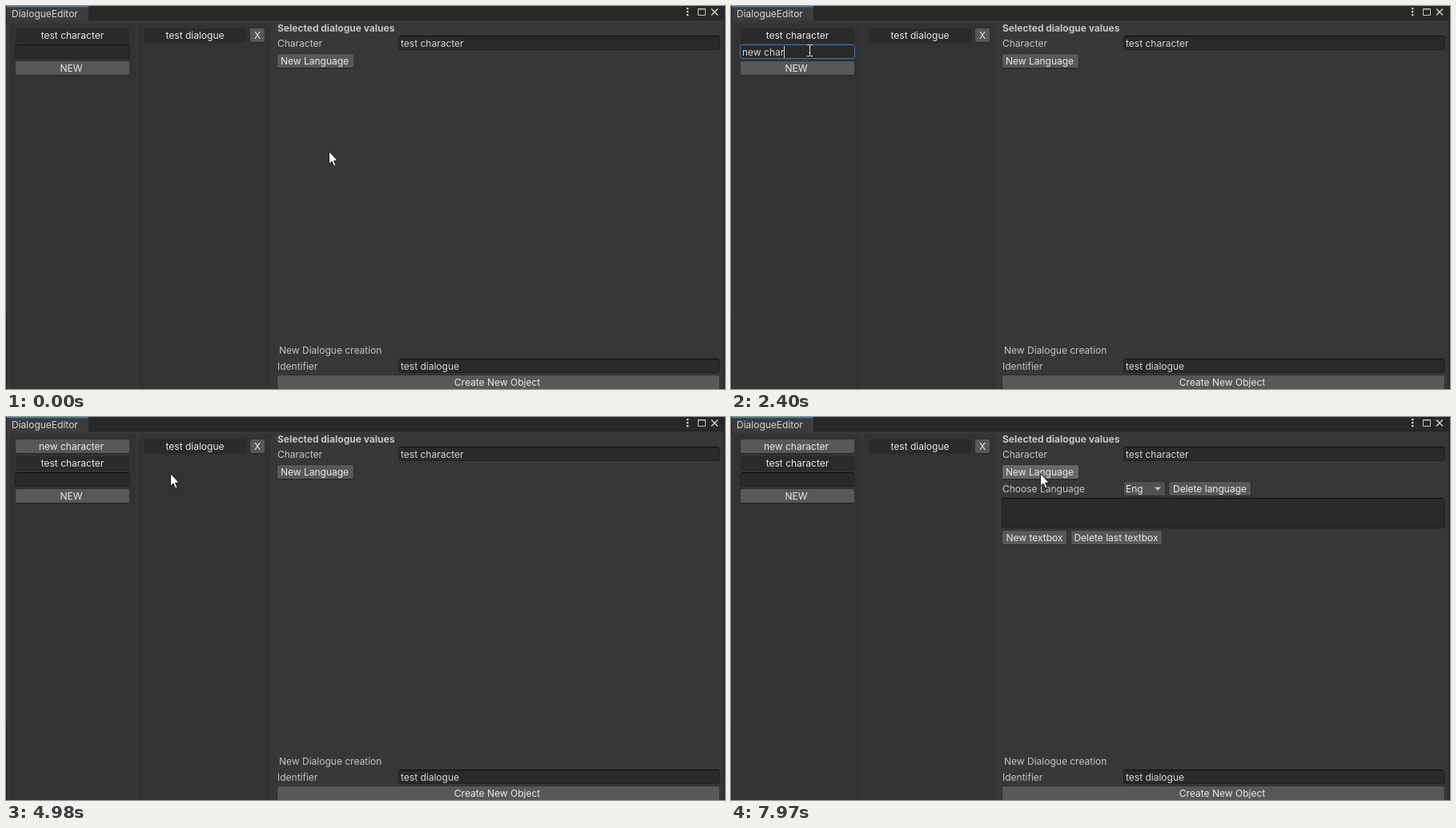
An HTML page that plays this animation: 898x478 px, repeating every 8 s.

```html
<!DOCTYPE html>
<html lang="en">
<head>
<meta charset="utf-8">
<title>Dialogue editor</title>
<style>
  html, body { margin: 0; width: 100%; height: 100%; overflow: hidden; background: #383838; }
  svg { display: block; width: 898px; height: 478px; }
  text { font: 12px Inter, Roboto, sans-serif; fill: #c4c4c4; white-space: pre; }
  .lit { fill: #e8e8e8; }
  .value { fill: #d6d6d6; }
  .mid { text-anchor: middle; }
  .bold { font-weight: 700; }
</style>
</head>
<body>
<svg id="stage" viewBox="0 0 898 478"></svg>
<script>
const LOOP = 8000;
const stage = document.getElementById('stage');

function add(parent, tag, attrs, text) {
  const node = document.createElementNS('http://www.w3.org/2000/svg', tag);
  for (const key in attrs) node.setAttribute(key, attrs[key]);
  if (text !== undefined) node.textContent = text;
  parent.appendChild(node);
  return node;
}
const group = (parent = stage) => add(parent, 'g', {});
const rect = (p, x, y, width, height, fill, rx = 0) =>
  add(p, 'rect', { x, y, width, height, fill, rx });
const label = (p, x, y, str, cls = '') => add(p, 'text', { x, y, class: cls }, str);
const show = (node, on) => node.setAttribute('display', on ? 'inline' : 'none');

function button(p, x, y, w, h, str, textX, textY, fill = '#585858') {
  rect(p, x - 1, y - 1, w + 2, h + 2, '#303030', 3);
  rect(p, x + 1, y + h, w - 2, 1, '#242424');
  const face = rect(p, x, y, w, h, fill, 2);
  label(p, textX, textY, str, textX > x + 8 ? 'lit mid' : 'lit');
  return face;
}
function picked(p, x, y, w, str, textX) {
  rect(p, x, y, w, 18, '#2b2b2b', 2);
  label(p, textX, y + 13, str, 'lit mid');
}
function field(p, x, y, w, h) {
  const box = add(p, 'rect', { x: x + .5, y: y + .5, width: w - 1, height: h - 1,
    rx: 2.5, fill: '#2a2a2a', stroke: '#212121' });
  const lip = rect(p, x + 2, y, w - 4, 1, '#0d0d0d');
  return { box, lip };
}

// Window frame
rect(stage, 0, 0, 898, 478, '#383838');
rect(stage, 0, 0, 898, 18, '#282828');
rect(stage, 0, 17, 898, 1, '#232323');
rect(stage, 1, 0, 102, 18, '#3c3c3c');
rect(stage, 1, 0, 102, 1.5, '#3a79bb');
rect(stage, 0, 18, 1.5, 460, '#262626');
rect(stage, 0, 22, 1.5, 363, '#412f45');
rect(stage, 895.5, 18, 2.5, 460, '#2b2b2b');
label(stage, 7, 14, 'DialogueEditor', 'value');
for (const y of [2, 6, 10]) rect(stage, 850, y, 2.4, 2.4, '#c4c4c4');
add(stage, 'path', { d: 'M864.5 3.5h9v8h-9zM864 4h10', fill: 'none', stroke: '#c4c4c4' });
add(stage, 'path', { d: 'M881 3.5l8 8m0-8l-8 8', stroke: '#d0d0d0', 'stroke-width': 1.5 });

// Panels
rect(stage, 5, 22, 157, 460, '#333', 3);
rect(stage, 165, 22, 166, 460, '#333', 3);

// Details column
label(stage, 339, 32, 'Selected dialogue values', 'bold');
label(stage, 339, 51, 'Character');
field(stage, 490, 37, 402, 18);
label(stage, 493, 51, 'test character', 'value');
label(stage, 341, 434, 'New Dialogue creation');
label(stage, 339, 454, 'Identifier');
field(stage, 490, 440, 402, 18);
label(stage, 493, 454, 'test dialogue', 'value');
button(stage, 339, 461, 552, 17, 'Create New Object', 613.5, 474);

// Character list before, just after adding, and after reselecting
const lists = [group(), group(), group()];
picked(lists[0], 12, 28, 142, 'test character', 83);
picked(lists[1], 12, 28, 142, 'new character', 81.5);
button(lists[1], 12, 49, 142, 17, 'test character', 83, 62);
button(lists[2], 12, 28, 142, 17, 'new character', 81.5, 41);
picked(lists[2], 12, 49, 142, 'test character', 83);

// Name entry with its button, moved down by a row when the list grows
const entry = group();
const name = field(entry, 11, 48, 144, 18);
const typed = label(entry, 14, 62, '', 'value');
const caret = rect(entry, 14, 50, 1, 15, '#d2d2d2');
button(entry, 12, 69, 142, 17, 'NEW', 81.5, 82);

// Dialogue list and language controls
const dialogue = group();
picked(dialogue, 172, 28, 128, 'test dialogue', 236);
button(dialogue, 305, 28, 18, 17, 'X', 314, 41);
const langFace = button(dialogue, 339, 60, 95, 17, 'New Language', 385.5, 73);
const empty = label(stage, 341, 72, 'No Dialogue to show');

const language = group();
label(language, 339, 94, 'Choose Language');
button(language, 491, 81, 51, 17, 'Eng', 493, 94, '#515151');
add(language, 'path', { d: 'M529 87.5h8l-4 4.5z', fill: '#c4c4c4' });
button(language, 547, 81, 102, 17, 'Delete language', 598, 94);
field(language, 338, 101, 554, 38);
button(language, 339, 142, 80, 17, 'New textbox', 379, 155);
button(language, 425, 142, 113, 17, 'Delete last textbox', 481, 155);

// Pointer
const pointer = group();
const arrow = add(pointer, 'path', {
  d: 'M.5 .5V16.3L4 13L6.6 18.8L9 17.8L6.5 12.1H11.2Z',
  fill: '#fff', stroke: '#111', 'stroke-width': .9 });
const beam = add(pointer, 'path', {
  d: 'M-3 -6.5H0M1 -6.5H4M.5 -6V7M-3 7.5H0M1 7.5H4M-.5 3.5H1.5',
  fill: 'none', stroke: '#e8e8e8' });
const ring = add(pointer, 'circle', { r: 12, fill: '#fe1', opacity: .68 });

const line = u => u;
const ease = u => u * u * (3 - 2 * u);
const easeIn = u => u * u;
const easeOut = u => 1 - (1 - u) ** 3;

// time, x, y, easing towards this point
const path = [
  [180, 403, 181],
  [1000, 96, 54, ease],
  [1200, 96, 54, line],
  [1290, 98, 55, line],
  [2880, 98, 55, line],
  [3330, 91, 82, ease],
  [3740, 91, 82, line],
  [4480, 102, 60, ease],
  [4590, 102, 61, line],
  [4840, 102, 61, line],
  [4980, 204, 70, easeIn],
  [5560, 442, 147, easeOut],
  [5680, 442, 147, line],
  [6000, 413, 98, line],
  [6480, 394, 77, easeOut],
  [6850, 387, 71, ease],
  [7950, 387, 71, line],
  [7970, 386, 70, line]
];
function pointerAt(t) {
  const i = path.findIndex(k => k[0] > t);
  if (i === 0) return path[0].slice(1, 3);
  if (i < 0) return path[path.length - 1].slice(1, 3);
  const a = path[i - 1], b = path[i];
  const u = b[3]((t - a[0]) / (b[0] - a[0]));
  return [1, 2].map(n => Math.round(a[n] + (b[n] - a[n]) * u));
}

const word = 'new character';
const keys = [1550, 1620, 1690, 1760, 1990, 2160, 2240, 2400, 2470, 2610, 2680, 2750, 2820];
const clicks = [[1180, 1290], [3470, 3570], [4730, 4840], [7630, 7760]];
const ADDED = 3570, PICKED = 4790, LANGUAGE = 7700;

function render(t) {
  const [x, y] = pointerAt(t);
  const phase = t < ADDED ? 0 : t < PICKED ? 1 : 2;
  const shift = phase ? 21 : 0;
  const focused = t >= 1180 && t < ADDED;
  const over = x >= 11 && x < 155 && y >= 48 + shift && y < 66 + shift;
  const pressed = clicks.some(([down, up]) => t >= down && t < up);

  lists.forEach((list, i) => show(list, i === phase));
  entry.setAttribute('transform', `translate(0 ${shift})`);
  show(dialogue, phase !== 1);
  show(empty, phase === 1);
  show(language, t >= LANGUAGE);
  langFace.setAttribute('fill', t >= 7630 ? '#676767' : '#585858');

  name.box.setAttribute('stroke', focused ? '#3a79bb' : over ? '#656565' : '#212121');
  show(name.lip, !focused && !over);
  const text = focused ? word.slice(0, keys.filter(k => k <= t).length) : '';
  if (typed.textContent !== text) typed.textContent = text;
  show(caret, focused);
  caret.setAttribute('x', Math.round(14 + (text ? typed.getComputedTextLength() : 0)));

  pointer.setAttribute('transform', `translate(${x} ${y})`);
  const asBeam = over && !pressed;
  show(beam, asBeam);
  show(arrow, !asBeam);
  show(ring, pressed);
}

const start = performance.now();
function tick() {
  render((performance.now() - start) % LOOP);
  requestAnimationFrame(tick);
}
tick();
</script>
</body>
</html>
```
